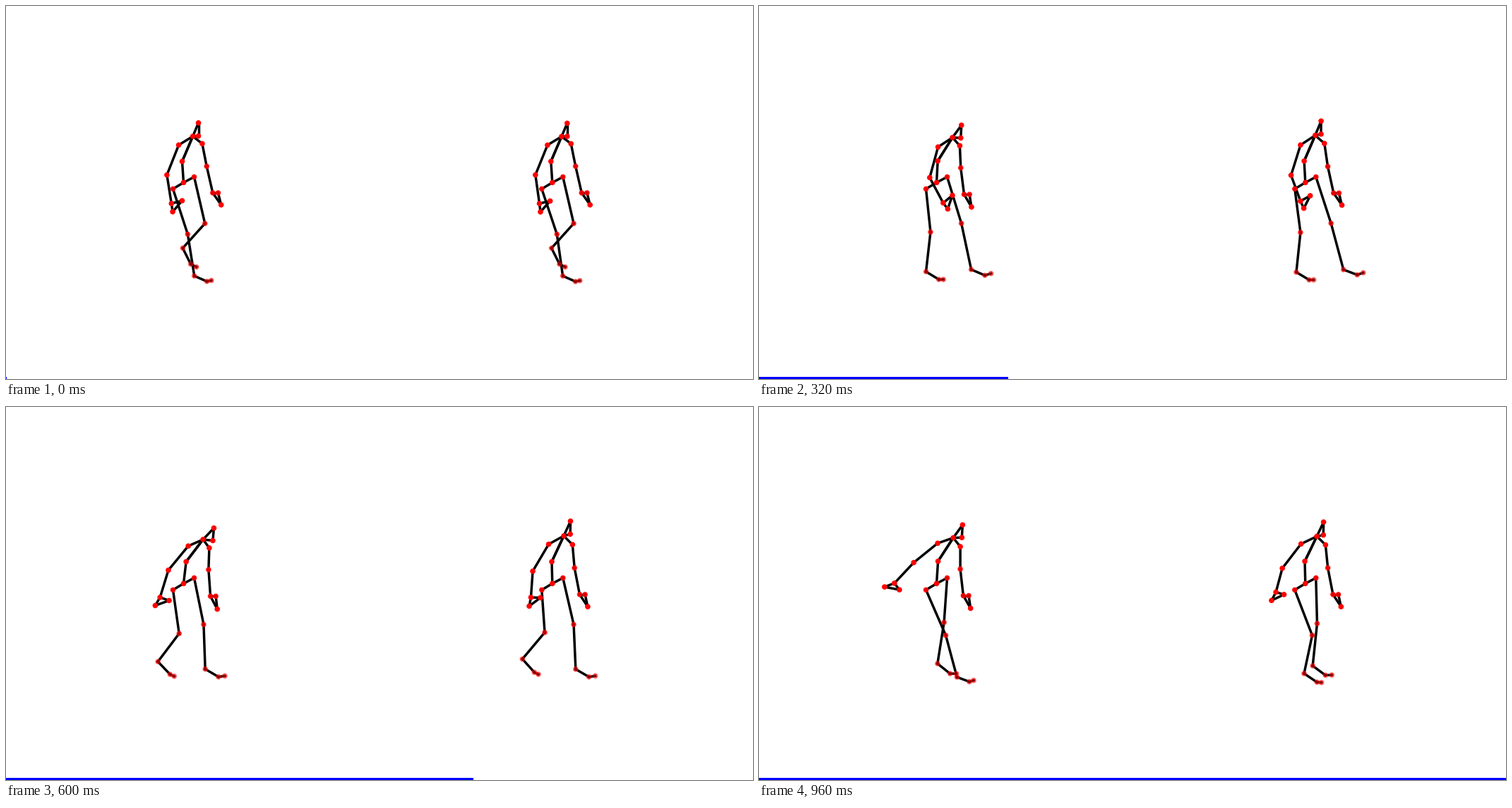
Write a matplotlib script that moves like this. It is 1058 px wide and 529 px high and loops after 1000 ms.

```python
import numpy as np
import matplotlib.pyplot as plt
from matplotlib.animation import FuncAnimation
from matplotlib.collections import LineCollection
from matplotlib.patches import Rectangle

W, H, DPI = 1058, 529, 100
FRAMES, INTERVAL = 25, 40

f = np.arange(FRAMES)
u = f / (FRAMES - 1)
KEYS = np.array([0, 4, 8, 11, 15, 20, 24])

# Joint chains; capitals give the side
CHAINS = [
    "root spine neck head nose neck",
    "spine neck",
    "neck shoulderL elbowL wristL thumbL tipL wristL",
    "neck shoulderR elbowR wristR thumbR tipR wristR",
    "root hipL kneeL ankleL footL toeL",
    "root hipR kneeR ankleR footR toeR",
]
LEG_FADE = dict(hip=0.88, knee=0.7, ankle=0.55, foot=0.53, toe=0.52)
FAR_ARM = {"elbowL", "wristL", "thumbL"}


def curve(*keys):
    """Natural cubic spline through the key angles, one value per frame."""
    v, h, n = np.array(keys, float), np.diff(KEYS), len(KEYS)
    a, b = np.eye(n), np.zeros(n)
    for i in range(1, n - 1):
        a[i, i - 1:i + 2] = h[i - 1], 2 * (h[i - 1] + h[i]), h[i]
        b[i] = 6 * ((v[i + 1] - v[i]) / h[i] - (v[i] - v[i - 1]) / h[i - 1])
    m = np.linalg.solve(a, b)
    k = np.clip(np.searchsorted(KEYS, f, side="right") - 1, 0, n - 2)
    p, q, d = KEYS[k + 1] - f, f - KEYS[k], h[k]
    return ((m[k] * p**3 + m[k + 1] * q**3) / (6 * d)
            + (v[k] / d - m[k] * d / 6) * p
            + (v[k + 1] / d - m[k + 1] * d / 6) * q)


def limb(deg, length):
    """Offset x + iy of a bone; 0 degrees hangs down, 90 points right."""
    r = np.radians(deg)
    return length * (np.sin(r) + 1j * np.cos(r))


def torso(root, lean, dip, swing):
    head = root + 21 + 22.2 * lean + 1j * (-84.1 + 5.4 * dip)
    return dict(
        root=root + 0 * u,
        spine=root - 2 + 5.7 * lean + 1j * (-30 - 1.6 * u),
        neck=root + 13.1 + 14.7 * lean + 1j * (-65.3 + 2.8 * dip),
        head=head,
        nose=head - 1.5 * lean + 1j * (18.6 - 0.8 * lean),
        shoulderL=root + 26.4 + 10.1 * lean + 1j * (-55.1 + 3.6 * lean + dip),
        shoulderR=root - 6.9 + 15.3 * lean - 2.5 * u
        + 1j * (-53.8 + 0.085 * swing + 2 * dip),
    )


def left_arm(shoulder, lean, dip):
    elbow = shoulder + 6.5 - 9.6 * lean + 2 * dip + 1j * (32 - 1.2 * dip)
    wrist = elbow + 8.6 - 6 * lean + 37.7j
    return dict(elbowL=elbow, wristL=wrist, thumbL=wrist + 7.6,
                tipL=wrist + 11.9 - 2.3 * lean + 1j * (17 + 1.3 * lean))


def right_arm(shoulder, swing, lag, shrink):
    elbow = shoulder + limb(0.5 * swing - 26 - lag, 45.6 - 2 * u)
    wrist = elbow + limb(swing, 41 - shrink * u)
    return dict(elbowR=elbow, wristR=wrist,
                thumbR=wrist + limb(93 + 1.3 * swing, 15 + 0.07 * swing - shrink * u / 3),
                tipR=wrist + limb(1.5 * swing - 5, 12.4 - 0.06 * swing))


def left_leg(hip, thigh, shank):
    knee = hip + limb(thigh, 64.3 + 0.27 * thigh)
    ankle = knee + limb(shank, 62.5 + 0.37 * shank)
    foot = ankle + limb(58 + 0.75 * shank, 22 - 0.08 * shank)
    toe = foot + limb(97 + 0.8 * shank, 9)
    return dict(hipL=hip + 0 * u, kneeL=knee, ankleL=ankle, footL=foot, toeL=toe)


def right_leg(hip, thigh, shank):
    knee = hip + limb(thigh, 58.5 + 0.5 * thigh)
    ankle = knee + limb(shank, 58 + 0.22 * shank)
    foot = ankle + limb(62 + 0.5 * shank, 20.5 - 0.12 * shank)
    toe = foot + limb(95 + 0.8 * shank, 6.4)
    return dict(hipR=hip + 0 * u, kneeR=knee, ankleR=ankle, footR=foot, toeR=toe)


def fade(joint):
    return LEG_FADE.get(joint[:-1], 0.86 if joint in FAR_ARM else 1)


class Walker:
    def __init__(self, ax, root, lean, dip, swing, lag, shrink, left, right):
        pts = torso(root, lean, dip, swing)
        pts |= left_arm(pts["shoulderL"], lean, dip)
        pts |= right_arm(pts["shoulderR"], swing, lag, shrink)
        pts |= left_leg(root + 15 - 8j, *left)
        pts |= right_leg(root - 15 + 9j, *right)
        self.pts = {j: np.column_stack([z.real, z.imag]) for j, z in pts.items()}

        self.bones = ax.add_collection(LineCollection(
            [], colors="black", linewidths=2.5, capstyle="projecting", zorder=2))
        rgba = [(1, 0, 0, fade(j)) for j in self.pts]
        start = np.array([p[0] for p in self.pts.values()])
        self.dots = ax.scatter(*start.T, s=20, c=rgba, linewidths=1, zorder=3)

    def pose(self, i):
        at = {j: p[i] for j, p in self.pts.items()}
        chains = [c.split() for c in CHAINS]
        self.bones.set_segments([(at[a], at[b]) for c in chains
                                 for a, b in zip(c, c[1:])])
        self.dots.set_offsets(list(at.values()))


fig = plt.figure(figsize=(W / DPI, H / DPI), dpi=DPI, facecolor="white")
ax = fig.add_axes([0, 0, 1, 1])
ax.set_xlim(0, W)
ax.set_ylim(H, 0)
ax.axis("off")

# Deep bend with a wide arm swing
bend = np.sin(np.pi * f / 33) ** 1.2
stooped = Walker(
    ax, 251.5 + 250.4j,
    lean=bend,
    dip=0.45 + 0.55 * np.cos(2 * np.pi * (f - 14.5) / 28),
    swing=curve(9, 24, 28, 13, -17, -42, -43),
    lag=5 * bend, shrink=1,
    left=(curve(13, 17, 17, 15, 11.5, 2, -4), curve(-42, -9, 12, 6, 2, -2.5, -9)),
    right=(curve(18, 11, 6, 0.5, 8, 21, 23.5), curve(9, 3, -6.5, -18, -37, -22, 15)),
)

# Upright, with a longer stride and a smaller arm swing
upright = Walker(
    ax, 773.8 + 250.4j,
    lean=0.276 * u + 0.06 * np.sin(2 * np.pi * f / 13.5),
    dip=-0.82 * np.sin(np.pi * f / 32),
    swing=curve(8, 19, 20, 13, -4, -18, -15),
    lag=4 * u, shrink=6,
    left=(curve(13, 18, 18, 17, 13, 6, 1.5), curve(-42, -9, 15, 13, 2.5, -3, -6)),
    right=(curve(18.5, 12, 7.5, 4, 4, 16, 21), curve(8, 2, -6, -16, -40, -45, -12)),
)

walkers = [stooped, upright]
bar = ax.add_patch(Rectangle((0, H), 0, -3, facecolor="blue", linewidth=0))


def draw(i):
    for w in walkers:
        w.pose(i)
    bar.set_width(W * u[i] + 0.7)
    return [bar]


anim = FuncAnimation(fig, draw, frames=FRAMES, interval=INTERVAL,
                     init_func=lambda: draw(0), repeat=True, repeat_delay=0)
plt.show()
```
